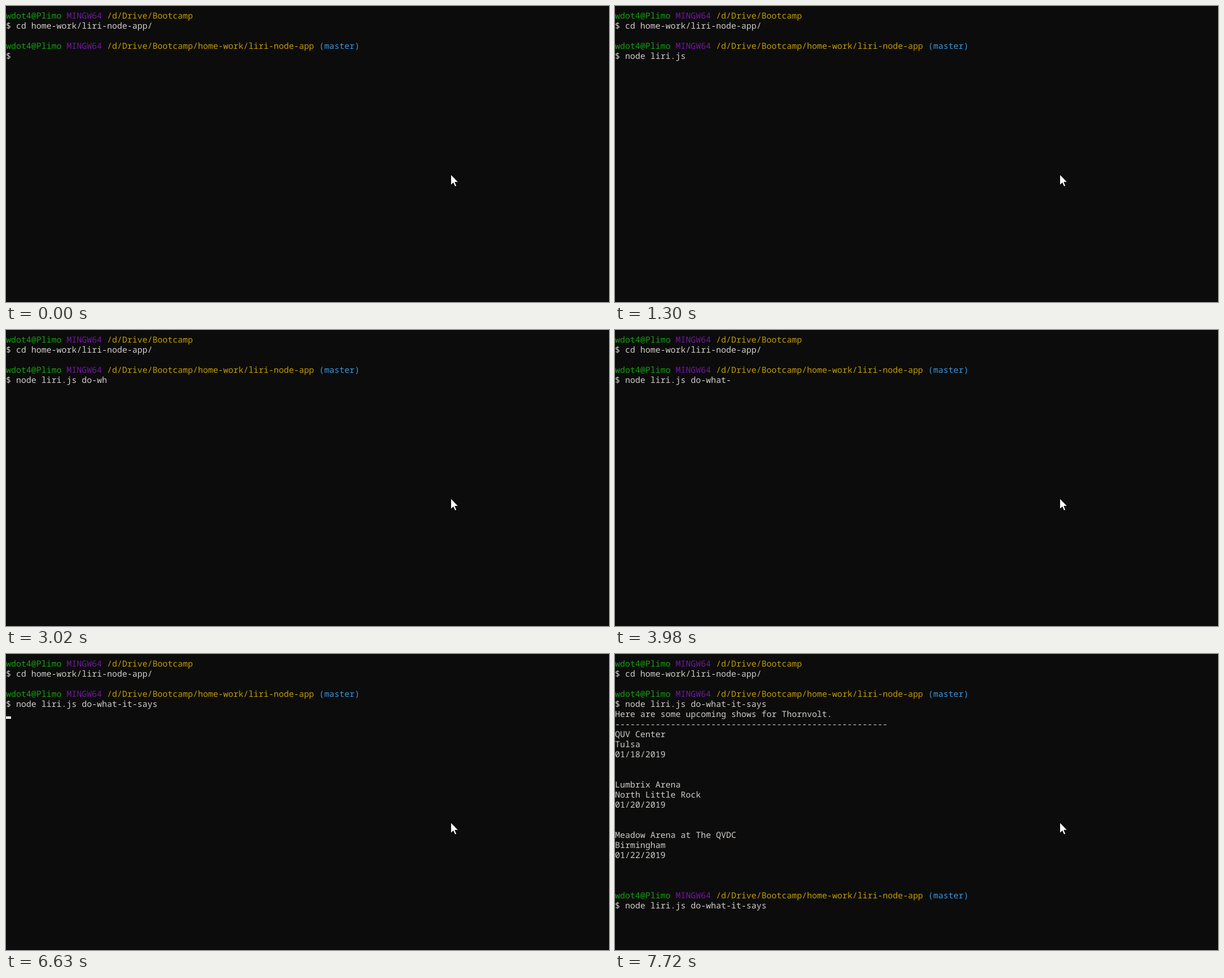
An HTML page that plays this animation: 955x470 px, repeating every 8 s.

```html
<!DOCTYPE html>
<html lang="en">
<head>
<meta charset="utf-8">
<title>Terminal session</title>
<style>
  html, body { margin: 0; width: 100%; height: 100%; overflow: hidden; background: #0c0c0c; }
  svg { display: block; }
  text {
    font: 13.3333px "Noto Sans Mono", "DejaVu Sans Mono", monospace;
    white-space: pre;
    text-rendering: geometricPrecision;
  }
</style>
</head>
<body>
<svg id="stage" width="955" height="470" viewBox="0 0 955 470">
  <rect width="955" height="470" fill="#0c0c0c"/>
  <g id="screen"></g>
  <rect id="caret" width="8" height="4" fill="#f2f2f2"/>
  <path d="M704.5 267.5v17l3.9-3.7 2.6 5.9 2.6-1.1-2.6-5.8h5.3z" fill="#fff" stroke="#000" stroke-width=".8"/>
</svg>
<script>
const LOOP = 8000, CELL = 8, ROW = 16, TOP = 8;
const WHITE = '#d0cdc8', GREEN = '#13a10e', PURPLE = '#7119a0', YELLOW = '#c19c00', BLUE = '#3a96dd';
const screen = document.getElementById('screen');
const caret = document.getElementById('caret');

function add(tag, parent, attrs = {}) {
  const el = document.createElementNS('http://www.w3.org/2000/svg', tag);
  for (const key in attrs) el.setAttribute(key, attrs[key]);
  return parent.appendChild(el);
}

function write(parent, row, col, string, fill = WHITE) {
  const el = add('text', parent, { x: col * CELL, y: TOP + row * ROW + 12, fill });
  el.textContent = string;
  return el;
}

function prompt(parent, row, path, branch = '') {
  write(parent, row, 0, 'wdot4@Plimo', GREEN);
  write(parent, row, 12, 'MINGW64', PURPLE);
  write(parent, row, 20, path, YELLOW);
  write(parent, row, 21 + path.length, branch, BLUE);
  write(parent, row + 1, 0, '$');
}

const HOME = '/d/Drive/Bootcamp', APP = HOME + '/home-work/liri-node-app';
prompt(screen, 0, HOME);
write(screen, 1, 2, 'cd home-work/liri-node-app/');
prompt(screen, 3, APP, '(master)');
const command = write(screen, 4, 2, '');

const output = add('g', screen);
write(output, 5, 0, 'Here are some upcoming shows for Thornvolt.');
write(output, 6, 0, '-'.repeat(54));
[
  ['QUV Center', 'Tulsa', '01/18/2019'],
  ['Lumbrix Arena', 'North Little Rock', '01/20/2019'],
  ['Meadow Arena at The QVDC', 'Birmingham', '01/22/2019']
].forEach((show, i) => show.forEach((line, j) => write(output, 7 + i * 5 + j, 0, line)));

const nextPrompt = add('g', screen);
prompt(nextPrompt, 23, APP, '(master)');
const recalled = write(nextPrompt, 24, 2, 'node liri.js do-what-it-says');

// Typed text by time; a tab press completes the file name.
const FILE = 'node liri.js ', FULL = FILE + 'do-what-it-says';
const typing = [[0, '']];
['n', 'no', 'nod', 'node', 'node ', 'node l', 'node li', FILE]
  .forEach((s, i) => typing.push([230 + i * 120, s]));
'do-what'.split('').forEach((c, i) =>
  typing.push([2400 + i * 147, FILE + 'do-what'.slice(0, i + 1)]));
typing.push([3570, FILE + 'do-what-']);
['i', 'it', 'it-', 'it-s', 'it-sy'].forEach((s, i) =>
  typing.push([4060 + i * 177, FILE + 'do-what-' + s]));
typing.push([5230, FULL.slice(0, -2)], [5370, FULL.slice(0, -2)]);
typing[typing.length - 2][1] = FULL.slice(0, -3);
typing.push([5510, FULL.slice(0, -1)], [5650, FULL]);

// Spans in which the caret shows: start, end, row, column (null follows the typing).
const caretSpans = [
  [1070, 1300, 4, null], [1850, 2400, 4, null], [3280, 3430, 4, null],
  [3570, 3980, 4, null], [4765, 5080, 4, null], [5790, 5930, 4, null],
  [5930, 6070, 5, 0], [6630, 6790, 5, 0], [6990, 7180, 24, 2], [7640, 7720, 24, 30]
];

const show = (el, on) => el.setAttribute('visibility', on ? 'visible' : 'hidden');

function render(t) {
  const typed = typing.filter(([start]) => start <= t).pop()[1];
  command.textContent = typed;
  show(output, t >= 6790);
  show(nextPrompt, t >= 6990);
  show(recalled, t >= 7550);

  const span = caretSpans.find(([start, end]) => t >= start && t < end);
  show(caret, span);
  if (span) {
    const [, , row, col] = span;
    caret.setAttribute('x', (col ?? 2 + typed.length) * CELL);
    caret.setAttribute('y', TOP + row * ROW + 11);
  }
}

const begin = performance.now();
function tick() {
  render((performance.now() - begin) % LOOP);
  requestAnimationFrame(tick);
}
tick();
</script>
</body>
</html>
```
